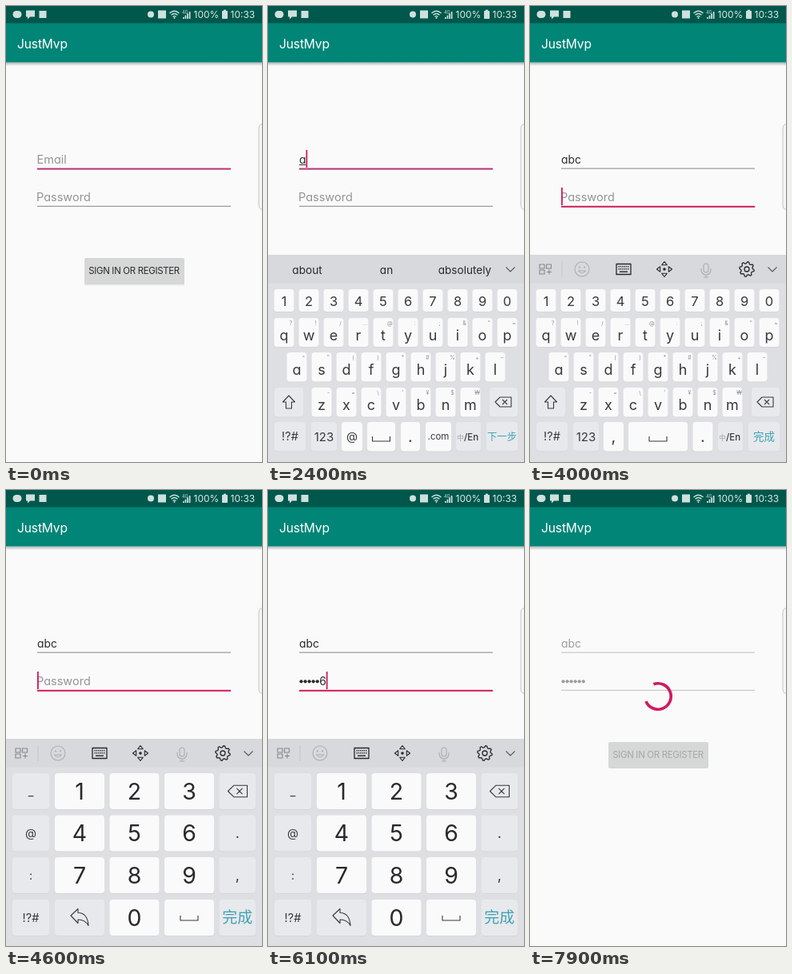
An HTML page that plays this animation: 320x570 px, repeating every 8 s.

```html
<!DOCTYPE html>
<html lang="en">
<head>
<meta charset="utf-8">
<title>Sign in</title>
<style>
  html, body { margin: 0; width: 100%; height: 100%; overflow: hidden; background: #fafafa; }
  svg { display: block; width: 320px; height: 570px; }
  text { font-family: Inter, "Noto Sans CJK SC", "Noto Sans CJK", "Open Sans", sans-serif; font-feature-settings: "cv11"; white-space: pre; }
</style>
</head>
<body>
<svg id="stage" viewBox="0 0 320 570"></svg>
<script>
const LOOP = 8000, STEP = 100;
const ACCENT = '#d01b5f', INK = '#28292a', KEY_INK = '#38393b', TEAL = '#3fa3b5';
const stage = document.getElementById('stage');

function el(tag, attrs, parent = stage) {
  const node = document.createElementNS('http://www.w3.org/2000/svg', tag);
  parent.append(node);
  return set(node, attrs);
}
function set(node, attrs) {
  for (const k in attrs) node.setAttribute(k, attrs[k]);
  return node;
}
const group = (parent = stage) => el('g', {}, parent);
const rect = (x, y, width, height, fill, parent, rx = 0) =>
  el('rect', { x, y, width, height, fill, rx }, parent);
const circle = (cx, cy, r, fill, parent) => el('circle', { cx, cy, r, fill }, parent);
const line = (d, stroke, parent, width = 1.1) =>
  el('path', { d, stroke, fill: 'none', 'stroke-width': width, 'stroke-linejoin': 'round' }, parent);
function text(str, x, y, size, fill, parent, more = {}) {
  const node = el('text', { x, y, fill, 'font-size': size, ...more }, parent);
  node.textContent = str;
  return node;
}
const centred = { 'text-anchor': 'middle' };
const show = (node, on) => { node.style.display = on ? '' : 'none'; };

// Page and app bar
const defs = el('defs');
function fade(id, color, opacity) {
  const g = el('linearGradient', { id, x1: 0, y1: 0, x2: 0, y2: 1 }, defs);
  el('stop', { offset: 0, 'stop-color': color, 'stop-opacity': opacity }, g);
  el('stop', { offset: 1, 'stop-color': color, 'stop-opacity': 0 }, g);
}
fade('shade', '#000', 0.28);
rect(0, 0, 320, 570, '#fafafa');
rect(0, 70.5, 320, 4.5, 'url(#shade)');
rect(0, 0, 320, 70.5, '#008577');
rect(0, 0, 320, 21.5, '#00574b');
text('JustMvp', 14, 53, 15.6, '#fff', stage, { 'letter-spacing': -0.15 });
el('path', { d: 'M321 147.500 Q316 148 316 153 V249 Q316 254 321 254.500', fill: '#f5f5f5', stroke: '#c3c5c5' });

// Status bar
const PALE = '#cfe0dd';
rect(8.5, 6, 11, 9, PALE, stage, 4.5);
el('path', { d: 'M25 5.500 H36 V13.500 H30 L27 16.500 V13.500 H25 Z', fill: PALE });
rect(41.500, 6, 9, 9, PALE);
circle(181, 10.500, 4, PALE);
rect(190, 5.500, 10, 10, PALE);
line('M204.500 9 Q210.500 3.500 216.500 9 M206.500 11.300 Q210.500 7.700 214.500 11.300 M208.500 13.500 Q210.500 11.800 212.500 13.500', PALE, stage, 1.3);
circle(210.500, 15, 1, PALE);
text('4G', 220, 9.500, 5.500, PALE);
for (let i = 0; i < 4; i++) rect(221 + i * 2.600, 14 - i * 2.300, 1.7, 2 + i * 2.300, PALE);
text('100%', 234.500, 15, 12, '#dcebe8');
rect(270, 6, 7, 10, PALE, stage, 0.7);
rect(272, 4.700, 3, 2, PALE);
text('10:33', 280.500, 15, 12, '#dcebe8');

// Form
const hintMail = text('Email', 38.500, 197, 14.5, '#949494');
const hintPass = text('Password', 38, 244, 14.5, '#949494');
const mail = text('', 39, 197, 13.8, INK);
const compose = rect(39, 198, 24, 1, INK);
const dots = Array.from({ length: 6 }, (_, i) => circle(41.500 + i * 5.050, 239.300, 2.1, INK));
const digit = text('', 39, 244, 13.8, INK);
const mailLine = rect(39, 202.6, 242, 2);
const passLine = rect(39, 249.8, 242, 1);
const caret = rect(39, 180, 1.8, 22, ACCENT);
const shadow = rect(98, 341, 125, 9.500, 'url(#shade)', stage, 2);
const button = rect(98, 315, 125, 33, '#d6d7d7', stage, 2);
const buttonText = text('SIGN IN OR REGISTER', 160, 335.300, 11.4, INK, stage,
  { ...centred, 'letter-spacing': -0.3 });
const spinner = el('circle', { cx: 160, cy: 258, r: 16.2, fill: 'none', stroke: ACCENT, 'stroke-width': 3.7, pathLength: 360 });

// Keyboard
const board = group();
rect(0, 311, 320, 259, '#dedfe2', board);
rect(0, 311, 320, 35.500, '#d8d9dc', board);
const keys = {};

function key(id, x, y, w, h, parent, soft) {
  const fill = soft ? '#e8e9ec' : '#fafafb';
  rect(x, y + 0.7, w, h, '#d3d4d7', parent, 4);
  keys[id] = { node: rect(x, y, w, h, fill, parent, 4), fill };
}
function labelKey(label, x, y, w, h, size, parent, soft, fill = KEY_INK, id = label) {
  key(id, x, y, w, h, parent, soft);
  text(label, x + w / 2, y + h / 2 + size * 0.36, size, fill, parent, centred);
}
function backspace(cx, cy, parent, k = 1) {
  line(`M${cx - 10 * k} ${cy} l${6 * k} ${-6 * k} h${14 * k} v${12 * k} h${-14 * k} Z
    M${cx - k} ${cy - 3 * k} l${6 * k} ${6 * k} m0 ${-6 * k} l${-6 * k} ${6 * k}`, KEY_INK, parent);
}
const spaceMark = (cx, cy, half, parent) =>
  line(`M${cx - half} ${cy - 3} v6 h${half * 2} v-6`, KEY_INK, parent);

// Tool icons
const tools = group(board), DIM = '#acaeb1';
for (const [x, y, w] of [[12, 323, 6], [20.500, 323, 6], [12, 330, 6]])
  line(`M${x} ${y} h${w} v5 h${-w} Z`, '#85888b', tools);
line('M21 332.500 h6 m-3 -3 v6', '#85888b', tools);
line('M40 319 V339', '#c6c8cb', tools);
line('M74 329 a9 9 0 1 0 -18 0 a9 9 0 1 0 18 0 M60.500 331 q4.500 5.500 9 0 Z', DIM, tools);
circle(62, 326.500, 1.1, DIM, tools);
circle(68, 326.500, 1.1, DIM, tools);
line('M108 322.500 h18 v13 h-18 Z', INK, tools, 1.3);
for (let i = 0; i < 12; i++)
  rect(110.500 + (i % 6) * 2.300, 325 + (i > 5) * 3, 1.3, 1.5, INK, tools);
rect(112, 331.500, 10, 1.4, INK, tools);
for (let a = 0; a < 360; a += 90)
  set(line('M168 319.500 l3.200 4.200 h-6.400 Z', INK, tools), { transform: `rotate(${a} 168 329)` });
circle(168, 329, 1.8, INK, tools);
const mic = line('M217 325 a3 3 0 0 1 6 0 v5 a3 3 0 0 1 -6 0 Z M214 328 v2 a6 6 0 0 0 12 0 v-2 M220 336 v3 M217 339 h6', DIM, tools);
const cog = Array.from({ length: 32 }, (_, i) => {
  const a = (i + 0.5) * Math.PI / 16, r = i % 4 < 2 ? 9.3 : 7.2;
  return `${271 + r * Math.cos(a)} ${329 + r * Math.sin(a)}`;
});
line(`M${cog.join('L')}Z M274 329 a3 3 0 1 0 -6 0 a3 3 0 1 0 6 0`, INK, tools, 1.3);

const words = group(board);
text('about', 49, 335, 13.6, INK, words, centred);
text('an', 148, 335, 13.6, INK, words, centred);
text('absolutely', 246, 335, 13.6, INK, words, centred);
line('M297.500 326.500 l5.500 5.500 l5.500 -5.500', '#555a5e', board);

// Letter layout
const letters = group(board);
const rows = [
  ['1234567890', '', 7.5, 354, 28],
  ['qwertyuiop', '?!/…@:;&"~', 7.5, 390, 36],
  ['asdfghjkl', '^"()*#%+–', 23.5, 433, 36.5],
  ['zxcvbnm', '-=\\\'¥$₩', 54.5, 477, 36.5]
];
for (const [chars, marks, x, y, h] of rows)
  [...chars].forEach((c, i) => {
    const kx = x + i * 31;
    key(c, kx, y, 25, h, letters);
    text(c, kx + 12.5, y + (marks ? 27.5 : 20.5), marks ? 18 : 16.5, KEY_INK, letters, centred);
    if (marks) text(marks[i] || '', kx + 21, y + 9, 7, '#8f9194', letters, centred);
  });
key('shift', 8, 477, 36, 36.5, letters, true);
line('M26 487 l7.500 8 h-4 v8 h-7 v-8 h-4 Z', KEY_INK, letters);
key('back', 277, 477, 35, 36.5, letters, true);
backspace(294, 495, letters);
const BY = 520, BH = 36.5;
labelKey('!?#', 8, BY, 39, BH, 14.5, letters, true);
labelKey('123', 54, BY, 32, BH, 15, letters, true);
key('lang', 235, BY, 31, BH, letters, true);
text('中', 236, 543, 9, '#a2a5a8', letters);
text('/En', 245, 543, 11.5, KEY_INK, letters, { 'font-weight': 500 });

const mailRow = group(letters);
labelKey('@', 92, BY, 26, BH, 14.5, mailRow);
key('space', 124, BY, 35, BH, mailRow);
spaceMark(141.500, 541, 11, mailRow);
labelKey('.', 166, BY, 24, BH, 20, mailRow);
labelKey('.com', 197, BY, 32, BH, 11.5, mailRow);
labelKey('下一步', 273, BY, 39, BH, 12.3, mailRow, true, TEAL, 'next');

const passRow = group(letters);
labelKey(',', 92, BY, 25, BH, 20, passRow, false, KEY_INK, 'comma');
key('wideSpace', 123, BY, 74, BH, passRow);
spaceMark(160, 541, 11, passRow);
labelKey('.', 203.500, BY, 25, BH, 20, passRow, false, KEY_INK, 'dot');
labelKey('完成', 273, BY, 39, BH, 13.5, passRow, true, TEAL, 'ok');

// Number layout
const pad = group(board);
const padY = [354, 406.500, 459, 512], padX = [61, 129.500, 198];
['_', '@', ':', '!?#'].forEach((c, i) =>
  labelKey(c, 8, padY[i], 46, 45, 14.5, pad, true, KEY_INK, 'side' + i));
for (let n = 1; n < 10; n++)
  labelKey(String(n), padX[(n - 1) % 3], padY[Math.floor((n - 1) / 3)], 62, 45, 28.5, pad, false, INK, 'n' + n);
key('return', 61, 512, 62, 45, pad, true);
line('M81 532 l9 -8.500 v5 q12 0 13 16 q-4 -7.500 -13 -7.500 v4.500 Z', KEY_INK, pad);
labelKey('0', 129.500, 512, 62, 45, 28.5, pad, false, INK, 'n0');
key('padSpace', 198, 512, 62, 45, pad);
spaceMark(229, 535, 11, pad);
key('padBack', 266.500, 354, 45.5, 45, pad, true);
backspace(289.500, 376.500, pad, 1.2);
labelKey('.', 266.500, 406.500, 45.5, 45, 18, pad, true, KEY_INK, 'padDot');
labelKey(',', 266.500, 459, 45.5, 45, 18, pad, true, KEY_INK, 'padComma');
labelKey('完成', 266.500, 512, 45.5, 45, 19, pad, true, TEAL, 'done');

// Each key acts on release
const taps = [
  ['a', 2300], ['b', 2600], ['c', 2900], ['next', 3600], ['123', 4400],
  ['n1', 4950], ['n2', 5150], ['n3', 5320], ['n4', 5480], ['n5', 5640], ['n6', 5800], ['done', 6300]
];
const TAP = Object.fromEntries(taps);
const SUBMIT = 7200, HOLD = 100;

const clamp = v => Math.min(1, Math.max(0, v));
const smooth = v => { v = clamp(v); return v * v * (3 - 2 * v); };

function boardLevel(t) {
  if (t < TAP.done) return 1 - (1 - clamp((t - 1540) / 160)) ** 2;
  return 1 - clamp((t - TAP.done) / 240) ** 2;
}

function drawForm(t, typed, pin) {
  const off = t >= SUBMIT, onPass = t >= TAP.next;
  const ink = off ? '#9d9d9d' : INK;
  mail.textContent = 'abc'.slice(0, typed);
  set(mail, { fill: ink });
  show(hintMail, !typed);
  show(hintPass, !pin);
  show(compose, typed && !onPass);
  const mailWidth = typed ? mail.getComputedTextLength() : 0;
  set(compose, { width: mailWidth });

  const masked = t >= TAP.n6 + 1500 ? pin : Math.max(0, pin - 1);
  dots.forEach((d, i) => { show(d, i < masked); set(d, { fill: ink }); });
  digit.textContent = pin > masked ? pin : '';
  set(digit, { x: 39 + masked * 5.05, fill: ink });
  const passWidth = masked * 5.05 + (pin > masked ? 8.5 : 0);

  const rest = off ? '#bdbdbd' : '#858585';
  const live = t < 3500 ? '#b93274' : ACCENT;
  set(mailLine, { fill: onPass ? rest : live, height: onPass ? 1 : 2 });
  set(passLine, { fill: onPass && !off ? ACCENT : rest, height: onPass && !off ? 2 : 1 });

  const last = taps.filter(([id, at]) => at <= t && id !== '123' && id !== 'done').pop();
  const since = t - (last ? last[1] : -600);
  show(caret, !off && Math.floor(since / 500) % 2 === 0);
  set(caret, { x: 39 + (onPass ? passWidth : mailWidth), y: onPass ? 227 : 180 });

  show(shadow, !off);
  set(button, { fill: !off && t >= SUBMIT - HOLD ? '#c2c3c3' : '#d6d7d7' });
  set(buttonText, { fill: off ? '#a6a6a6' : INK });
}

function drawSpinner(t) {
  const dt = t - SUBMIT, p = dt / 1333 % 1;
  show(spinner, dt >= 0);
  const head = 270 * smooth(p * 2), tail = 270 * smooth(p * 2 - 1);
  const turn = 125 + tail + p * 90 + dt / 6665 * 720;
  set(spinner, { 'stroke-dasharray': `${Math.max(2, head - tail)} 360`, transform: `rotate(${turn} 160 258)` });
}

function drawBoard(t, typed) {
  const level = boardLevel(t), onPass = t >= TAP.next, numeric = t >= TAP['123'];
  show(board, level > 0);
  set(board, { opacity: level, transform: `translate(0 ${42 * (1 - level)})` });
  const suggest = typed > 0 && !onPass;
  show(words, suggest);
  show(tools, !suggest);
  set(mic, { stroke: onPass ? DIM : INK });
  show(letters, !numeric);
  show(mailRow, !onPass);
  show(passRow, onPass);
  show(pad, numeric);
  for (const [id, at] of taps)
    set(keys[id].node, { fill: t >= at - HOLD && t < at ? '#c9cacd' : keys[id].fill });
}

function frame() {
  const t = Math.floor(performance.now() % LOOP / STEP) * STEP;
  const count = ids => ids.filter(id => t >= TAP[id]).length;
  const typed = count(['a', 'b', 'c']);
  const pin = count(['n1', 'n2', 'n3', 'n4', 'n5', 'n6']);
  drawForm(t, typed, pin);
  drawSpinner(t);
  drawBoard(t, typed);
  requestAnimationFrame(frame);
}
frame();
</script>
</body>
</html>
```
